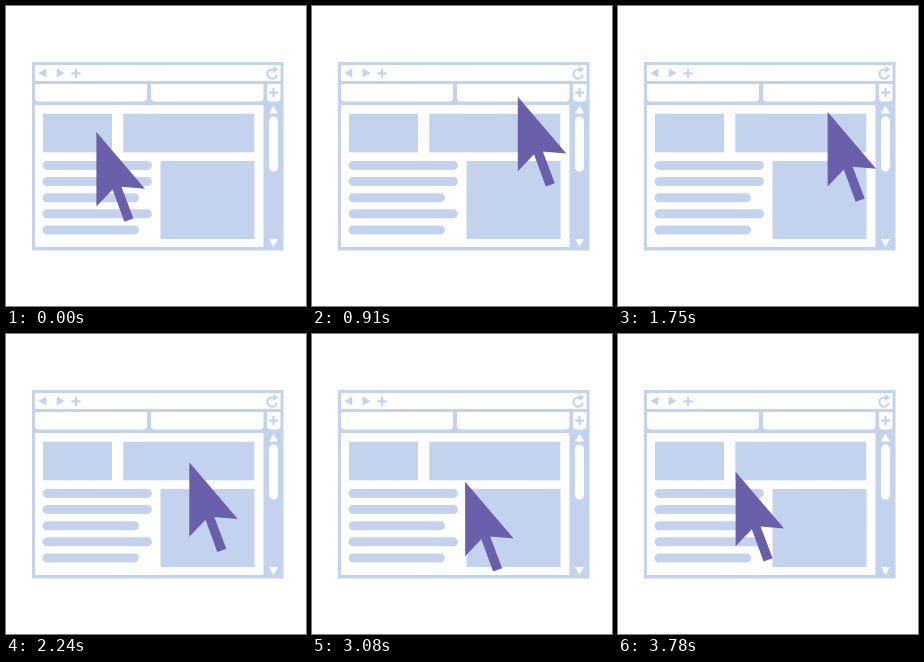
An HTML page for the animation above (3850 ms loop, 300 by 300 pixels).

```html
<!DOCTYPE html>
<html lang="en">
<head>
<meta charset="utf-8">
<title>Cursor over a browser window</title>
<style>
  html, body { margin: 0; width: 100%; height: 100%; overflow: hidden; background: #fff; }
  svg { display: block; width: 100vw; height: 100vh; }
  .blue { fill: #c4d3ed; }
  .white { fill: #fff; }
  .line { fill: none; stroke: #c4d3ed; stroke-width: 2.2; }
  #text { stroke: #c4d3ed; stroke-width: 9; stroke-linecap: round; }
</style>
</head>
<body>
<svg viewBox="0 0 300 300">
  <defs>
    <clipPath id="tabRow"><rect x="29" y="78" width="246" height="18"/></clipPath>
    <path id="plus" class="line" d="M-4.6 0H4.6M0 -4.6V4.6"/>
    <path id="arrow" d="M-4.500 4L0 -4L4.500 4Z"/>
  </defs>

  <rect class="blue" x="26" y="56" width="251.500" height="188.500"/>
  <g class="white">
    <rect x="29" y="59" width="245.500" height="16"/>
    <rect x="29" y="99" width="228.500" height="142"/>
    <g clip-path="url(#tabRow)">
      <rect x="29" y="70" width="112" height="25.600" rx="4"/>
      <rect x="145" y="70" width="112.500" height="25.600" rx="4"/>
      <rect x="261" y="70" width="13.500" height="25.600" rx="4"/>
    </g>
    <rect x="263" y="110.500" width="9" height="55" rx="4.500"/>
    <use href="#arrow" transform="translate(267.5 103.5)"/>
    <use href="#arrow" transform="translate(267.5 237) rotate(180)"/>
  </g>

  <g class="blue">
    <use href="#arrow" transform="translate(36.3 67) rotate(-90)"/>
    <use href="#arrow" transform="translate(54.7 67) rotate(90)"/>
    <path d="M267 60L272.500 63.500L267 67Z"/>
    <rect x="37" y="107.700" width="69" height="38.600"/>
    <rect x="117.300" y="107.700" width="131" height="38.600"/>
    <rect x="154.500" y="155" width="94" height="78"/>
  </g>
  <use href="#plus" x="70" y="67.300"/>
  <use href="#plus" x="267.500" y="86.600"/>
  <path class="line" d="M267 63.500H266A4.600 4.600 0 1 0 270.600 68.500"/>
  <path id="text"/>
  <path id="cursor" fill="#6a5fab" d="M0 0L48.500 56.700L25 54.700L37 86.500L28 89.700L16.200 57.500L0 74.500Z"/>
</svg>
<script>
  const LOOP = 3850, STEP = 70, SWEEP = 910;
  const byId = id => document.getElementById(id);

  // Long, long, short, long, short
  byId("text").setAttribute("d", Array.from({ length: 5 }, (_, i) =>
    `M41 ${159.4 + 16.15 * i}H${i === 2 || i === 4 ? 128.5 : 141.5}`).join(""));

  const start = { x: 90.4, y: 126 };
  const drift = [
    { t: SWEEP, x: 205.8, y: 90.7 },
    { t: 1470, x: 217, y: 97 },
    { t: 2240, x: 183.3, y: 128.2 },
    { t: 2800, x: 160.2, y: 145.4 },
    { t: 3360, x: 145.3, y: 148.8 },
    { t: 3780, x: 117.6, y: 137.8 }
  ];
  const last = drift.length - 1;
  const slope = (i, axis) => (drift[i + 1][axis] - drift[i][axis]) / (drift[i + 1].t - drift[i].t);

  // The drift starts at rest and turns without overshoot
  function tangent(i, axis) {
    if (i === 0) return 0;
    if (i === last) return slope(i - 1, axis);
    const a = slope(i - 1, axis), b = slope(i, axis);
    return a * b > 0 ? 2 * a * b / (a + b) : 0;
  }

  function position(time, axis) {
    if (time < SWEEP) {
      const u = time / SWEEP, eased = u + 0.06 * u * (1 - u);
      return start[axis] + eased * (drift[0][axis] - start[axis]);
    }
    const next = drift.findIndex(key => key.t > time);
    const i = next < 0 ? last - 1 : next - 1;
    const from = drift[i], to = drift[i + 1], span = to.t - from.t;
    const u = (time - from.t) / span, v = 1 - u;
    return v * v * (1 + 2 * u) * from[axis] + u * u * (3 - 2 * u) * to[axis]
      + span * u * v * (v * tangent(i, axis) - u * tangent(i + 1, axis));
  }

  const cursor = byId("cursor"), begin = performance.now();

  function draw(now) {
    const time = Math.floor(Math.max(0, now - begin) % LOOP / STEP) * STEP;
    cursor.setAttribute("transform", `translate(${position(time, "x")} ${position(time, "y")})`);
    requestAnimationFrame(draw);
  }
  draw(begin);
</script>
</body>
</html>
```
